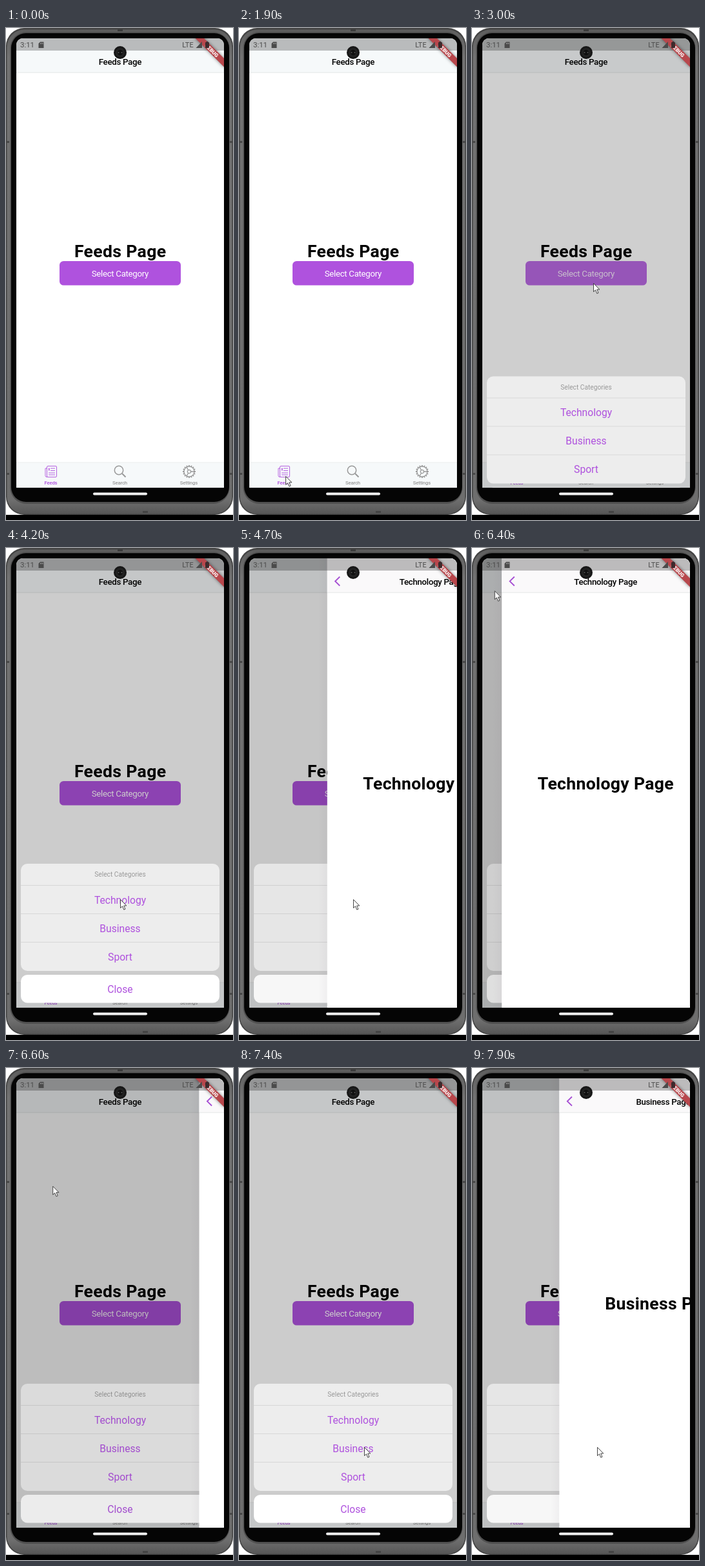
An HTML page with a canvas for the animation above (8 s loop, 352x762 px).

```html
<!DOCTYPE html>
<html lang="en">
<head>
<meta charset="utf-8">
<title>Feeds app demo</title>
<style>
html, body { margin: 0; width: 100%; height: 100%; overflow: hidden; background: #fff; }
canvas { display: block; width: 352px; height: 762px; }
</style>
</head>
<body>
<canvas id="stage"></canvas>
<script>
const W = 352, H = 762, LOOP = 8000;
const SCREEN = { x: 16, y: 16, w: 322, h: 696 };
const PURPLE = '#af52de', GREY = '#999';
const canvas = document.getElementById('stage');
const dpr = window.devicePixelRatio || 1;
canvas.width = W * dpr;
canvas.height = H * dpr;
const ctx = canvas.getContext('2d');

const clamp = v => Math.max(0, Math.min(1, v));
const span = (t, start, length) => clamp((t - start) / length);
const smooth = p => p * p * (3 - 2 * p);

// Cubic bezier (.35, .91, .33, .97), solved by bisection.
function settle(x) {
  if (x <= 0 || x >= 1) return clamp(x);
  const axis = (u, a, b) => 3 * (1 - u) ** 2 * u * a + 3 * (1 - u) * u * u * b + u ** 3;
  let lo = 0, hi = 1;
  for (let i = 0; i < 24; i++) {
    const mid = (lo + hi) / 2;
    if (axis(mid, .35, .33) < x) lo = mid; else hi = mid;
  }
  return axis(lo, .91, .97);
}

function rect(x, y, w, h, fill) {
  ctx.fillStyle = fill;
  ctx.fillRect(x, y, w, h);
}

function round(x, y, w, h, r, fill) {
  ctx.beginPath();
  ctx.roundRect(x, y, w, h, r);
  ctx.fillStyle = fill;
  ctx.fill();
}

function disc(x, y, r, fill) {
  ctx.beginPath();
  ctx.arc(x, y, r, 0, Math.PI * 2);
  ctx.fillStyle = fill;
  ctx.fill();
}

function line(points, color, width) {
  ctx.beginPath();
  points.forEach(([x, y], i) => i ? ctx.lineTo(x, y) : ctx.moveTo(x, y));
  ctx.strokeStyle = color;
  ctx.lineWidth = width;
  ctx.stroke();
}

function text(str, x, y, size, color, weight = 400, spacing = 0) {
  ctx.font = `${weight} ${size}px Roboto, sans-serif`;
  ctx.letterSpacing = spacing + 'px';
  ctx.textAlign = 'center';
  ctx.fillStyle = color;
  ctx.fillText(str, x + spacing / 2, y);
}

function phone() {
  rect(0, 0, W, H, '#fff');
  rect(0, 754, W, 8, '#000');
  round(0, 0, 352, 754, 28, '#444');
  const metal = ctx.createLinearGradient(0, 0, 0, 754);
  metal.addColorStop(0, '#5c5c5c');
  metal.addColorStop(.06, '#737373');
  metal.addColorStop(.97, '#6e6e6e');
  metal.addColorStop(1, '#555');
  round(1.5, 2.5, 349, 750, 27, metal);
  round(6.5, 6, 340, 731, 25, '#505050');
  round(8, 8, 338, 726, 23, '#050505');
  rect(0, 175, 5, 3, '#484848');
  rect(347, 175, 5, 3, '#484848');
  rect(0, 689, 5, 3, '#484848');
  rect(347, 689, 5, 3, '#484848');
  rect(173, 2, 8, 3, '#3b3b3b');
  rect(212, 748, 8, 3, '#444');
  round(135, 719.5, 84, 4, 2, '#f2f2f2');
}

function navBar(title, fill) {
  rect(16, 16, 322, 53, fill);
  rect(16, 68.6, 322, .8, '#dcdede');
  text(title, 177, 57, 13.3, '#000', 500, -.32);
}

function feedIcon() {
  ctx.strokeStyle = PURPLE;
  ctx.lineWidth = .9;
  ctx.beginPath();
  ctx.roundRect(63.5, 678.5, 15, 17, 1.5);
  ctx.moveTo(63.5, 682);
  ctx.lineTo(61, 682);
  ctx.lineTo(61, 693.5);
  ctx.quadraticCurveTo(61, 695.5, 64, 695.5);
  ctx.stroke();
  [682, 685.5, 689, 692].forEach((y, i) =>
    line([[i < 2 ? 69 : 66, y], [76, y]], PURPLE, .9));
  rect(66, 681.5, 1.5, 4, PURPLE);
}

function searchIcon() {
  ctx.beginPath();
  ctx.arc(175, 685, 6.7, 0, Math.PI * 2);
  ctx.strokeStyle = GREY;
  ctx.lineWidth = 1.5;
  ctx.stroke();
  line([[180, 690], [185.5, 695.5]], GREY, 2);
}

function gearIcon() {
  ctx.save();
  ctx.translate(284, 687);
  ctx.strokeStyle = GREY;
  ctx.lineWidth = 1.3;
  ctx.beginPath();
  ctx.arc(0, 0, 8, 0, Math.PI * 2);
  ctx.moveTo(2.6, 0);
  ctx.arc(0, 0, 2.6, 0, Math.PI * 2);
  ctx.stroke();
  for (let i = 0; i < 16; i++) {
    const a = i * Math.PI / 8, c = Math.cos(a), s = Math.sin(a);
    line([[c * 8, s * 8], [c * 10, s * 10]], GREY, 1.8);
  }
  for (let i = 0; i < 3; i++) {
    const a = i * Math.PI * 2 / 3, c = Math.cos(a), s = Math.sin(a);
    line([[c * 2.6, s * 2.6], [c * 8, s * 8]], GREY, 1.3);
  }
  ctx.restore();
}

function feedsPage(press) {
  rect(16, 16, 322, 696, '#fff');
  navBar('Feeds Page', '#f6f9fa');
  text('Feeds Page', 177, 355, 26.6, '#000', 600, .32);
  ctx.globalAlpha = press;
  round(83, 361, 188, 37.5, 6.3, PURPLE);
  text('Select Category', 177, 385, 13.3, '#fff', 400, -.32);
  ctx.globalAlpha = 1;
  rect(16, 673, 322, 39, '#f6f9fa');
  rect(16, 672.5, 322, .8, '#e6e9e9');
  feedIcon();
  searchIcon();
  gearIcon();
  text('Feeds', 69.5, 706.8, 7.8, PURPLE, 500, -.19);
  text('Search', 176.5, 706.8, 7.8, GREY, 500, -.19);
  text('Settings', 283.5, 706.8, 7.8, GREY, 500, -.19);
}

function sheet(p) {
  if (p <= 0) return;
  rect(16, 16, 322, 696, `rgba(0,0,0,${.2 * (1 - (1 - p) ** 2)})`);
  ctx.save();
  ctx.translate(0, (1 - p) * 223);
  round(23, 489, 308, 166, 10, '#ededed');
  round(23, 661, 308, 43.5, 10, '#fff');
  text('Select Categories', 177, 509, 10.2, GREY);
  ['Technology', 'Business', 'Sport'].forEach((name, i) => {
    rect(23, 522 + i * 44, 308, .8, '#d3d3d3');
    text(name, 177, 550.7 + i * 44, 15.66, PURPLE);
  });
  text('Close', 177, 688.7, 15.66, PURPLE);
  ctx.restore();
}

// v is the linear progress, p the eased share of the screen covered.
function detailPage(name, v, p) {
  if (p <= 0) return;
  const dx = (1 - p) * SCREEN.w, edge = SCREEN.x + dx;
  rect(16, 16, dx, 696, `rgba(0,0,0,${.13 * v})`);
  const shadow = ctx.createLinearGradient(edge - 14, 0, edge, 0);
  shadow.addColorStop(0, 'rgba(60,40,70,0)');
  shadow.addColorStop(1, 'rgba(60,40,70,.04)');
  rect(edge - 14, 16, 14, 696, shadow);
  ctx.save();
  ctx.translate(dx, 0);
  rect(16, 16, 322, 696, '#fff');
  navBar(name + ' Page', '#faf9fa');
  line([[35.5, 44.5], [28.3, 51.5], [35.5, 58.5]], '#a64fd3', 1.8);
  text(name + ' Page', 177, 374, 26.6, '#000', 600, .32);
  ctx.restore();
}

function banner() {
  ctx.save();
  ctx.translate(338, 16);
  ctx.rotate(Math.PI / 4);
  ctx.shadowColor = 'rgba(0,0,0,.5)';
  ctx.shadowBlur = 5 * dpr;
  rect(-32, 21.9, 64, 9.4, '#b8474c');
  ctx.shadowBlur = 0;
  text('DEBUG', 0, 29.5, 8, '#fff', 900);
  ctx.restore();
}

function statusBar() {
  const ink = '#4b4b4b';
  text('3:11', 33, 30.3, 11.5, ink);
  text('LTE', 282, 30, 11, ink);
  ctx.fillStyle = ink;
  ctx.beginPath();
  ctx.moveTo(53, 21.5);
  ctx.lineTo(58.5, 21.5);
  ctx.lineTo(58.5, 31);
  ctx.lineTo(50.5, 31);
  ctx.lineTo(50.5, 24);
  ctx.fill();
  for (let i = 0; i < 3; i++) rect(53 + i * 1.8, 23, .8, 2, '#aaa');
  ctx.fillStyle = ink;
  ctx.beginPath();
  ctx.moveTo(304, 21);
  ctx.lineTo(304, 31);
  ctx.lineTo(294.5, 31);
  ctx.fill();
  round(309, 22, 6, 9, 1, '#3d2b2d');
  rect(310.7, 20.8, 2.6, 1.5, '#3d2b2d');
}

function camera() {
  disc(177, 38, 10, '#171717');
  disc(177, 38, 7, '#222');
  disc(177, 38, 4.2, '#101010');
  disc(174.5, 38, 1, '#555');
  disc(179.5, 38, 1, '#555');
}

// Pointer stops: time, x, y.
const PATH = [
  [1900, 72, 694], [2000, 78, 678], [2600, 186, 400], [2700, 188, 395],
  [3650, 188, 395], [4200, 177, 544],
  [5340, 177, 544], [5400, 174, 509], [6100, 32, 58], [6200, 29, 48],
  [6370, 29, 48], [6600, 72, 182], [7100, 178, 534], [7300, 194, 587]
];

function cursor(t) {
  if (t < PATH[0][0]) return;
  let i = PATH.findIndex(k => k[0] > t);
  if (i < 0) i = PATH.length;
  const a = PATH[i - 1], b = PATH[i] || a;
  const p = a === b ? 0 : (t - a[0]) / (b[0] - a[0]);
  const e = a[0] === 3650 ? smooth(p) : p;
  ctx.save();
  ctx.translate(a[1] + (b[1] - a[1]) * e, a[2] + (b[2] - a[2]) * e);
  ctx.beginPath();
  [[.5, .5], [.5, 13.5], [3.5, 10.8], [5.8, 16.2], [8, 15.2], [5.7, 10], [9.8, 10]]
    .forEach(([x, y]) => ctx.lineTo(x, y));
  ctx.closePath();
  ctx.fillStyle = '#fff';
  ctx.fill();
  ctx.strokeStyle = '#333';
  ctx.lineWidth = .9;
  ctx.stroke();
  ctx.restore();
}

function draw(t) {
  ctx.setTransform(dpr, 0, 0, dpr, 0, 0);
  phone();

  const press = 1 - .5 * (span(t, 2760, 110) - span(t, 2870, 176));
  const pushTech = span(t, 4576, 500), popTech = span(t, 6383, 500);
  const pushBiz = span(t, 7775, 500);

  ctx.save();
  ctx.beginPath();
  ctx.roundRect(SCREEN.x, SCREEN.y, SCREEN.w, SCREEN.h, [10, 10, 0, 0]);
  ctx.clip();
  feedsPage(press);
  sheet(settle(span(t, 2889, 335)));
  detailPage('Technology', pushTech - popTech, settle(pushTech) - settle(popTech));
  detailPage('Business', pushBiz, settle(pushBiz));
  rect(16, 16, 322, 19, 'rgba(0,0,0,.25)');
  banner();
  statusBar();
  ctx.restore();

  camera();
  cursor(t);
}

const begin = performance.now();
function tick() {
  draw((performance.now() - begin) % LOOP);
  requestAnimationFrame(tick);
}
tick();
</script>
</body>
</html>
```
